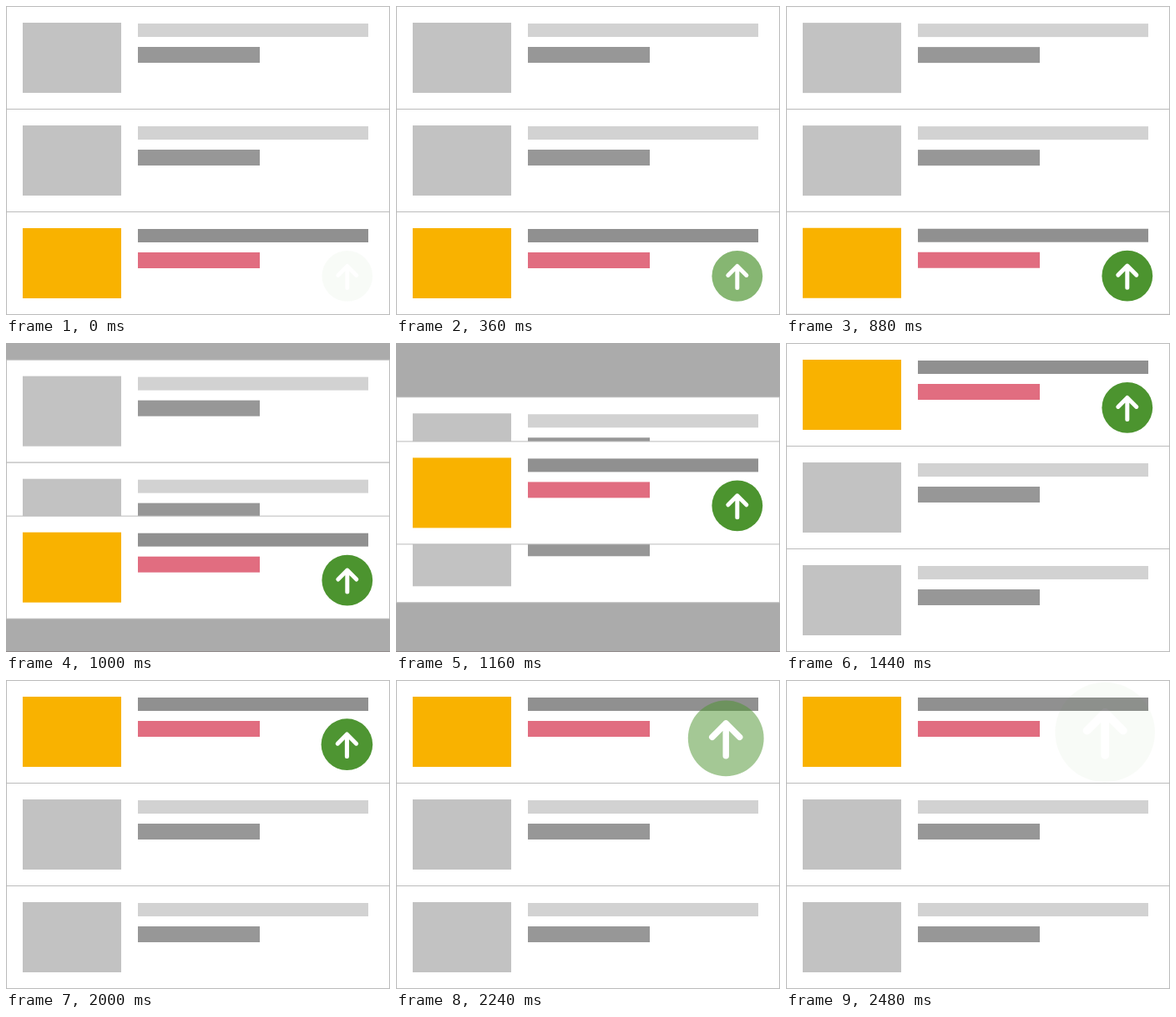
An HTML page that plays this animation: 460x370 px, repeating every 2840 ms.

```html
<!DOCTYPE html>
<html lang="en">
<head>
<meta charset="utf-8">
<title>Card moves to top</title>
<style>
  html, body { margin: 0; width: 100%; height: 100%; overflow: hidden; }
  svg { display: block; width: 460px; height: 370px; background: #ababab; }
  .card { fill: #fff; stroke: #bbb; }
  .thumb { fill: #c2c2c2; }
  .title { fill: #d2d2d2; }
  .label { fill: #979797; }
  .active .thumb { fill: #f9b200; }
  .active .title { fill: #909090; }
  .active .label { fill: #e16d80; }
  #badge circle { fill: #4c942f; }
  #badge path { fill: none; stroke: #fff; stroke-width: 5; stroke-linecap: round; stroke-linejoin: round; }
</style>
</head>
<body>
<svg viewBox="0 0 460 370">
  <defs>
    <g id="row">
      <rect class="card" x=".5" y=".5" width="459" height="123"/>
      <rect class="thumb" x="20" y="20" width="118" height="84"/>
      <rect class="title" x="158" y="21" width="276" height="16"/>
      <rect class="label" x="158" y="49" width="146" height="19"/>
    </g>
  </defs>
  <rect y="369" width="460" height="1" fill="#918b8b"/>
  <g id="others"></g>
  <g id="active" class="active"></g>
  <g id="badge">
    <circle r="30.4"/>
    <path d="M-11-1L0-12L11-1M0-12V14"/>
  </g>
</svg>
<script>
const LOOP = 2840, STEP = 40, ROW = 123;
const byId = id => document.getElementById(id);
const [row, others, active, badge] = ['row', 'others', 'active', 'badge'].map(byId);

function addRow(parent, y) {
  const copy = row.cloneNode(true);
  copy.removeAttribute('id');
  copy.setAttribute('transform', `translate(0 ${y})`);
  parent.append(copy);
}
addRow(others, 0);
addRow(others, ROW);
addRow(active, 0);

const progress = (t, start, end) => Math.min(1, Math.max(0, (t - start) / (end - start)));

// cubic-bezier(.25, 0, .75, 1), solved by bisection
function ease(x) {
  if (x === 0 || x === 1) return x;
  let low = 0, high = 1;
  for (let i = 0; i < 30; i++) {
    const p = (low + high) / 2, q = 1 - p;
    if (.75 * p * q * q + 2.25 * p * p * q + p ** 3 < x) low = p; else high = p;
  }
  return low * low * (3 - 2 * low);
}

const move = (node, x, y, scale = 1) =>
  node.setAttribute('transform', `translate(${x} ${y}) scale(${scale})`);

function draw(now) {
  const t = Math.floor(now % LOOP / STEP) * STEP;
  const fadeIn = Math.max(.03, progress(t, 27, 520));
  const lift = ease(progress(t, 872, 1429));
  const burst = Math.min(.968, progress(t, 1993, 2493));
  const activeY = 2 * ROW * (1 - lift);

  move(others, 0, ROW * lift);
  move(active, 0, activeY);
  move(badge, 408.8 - 27.5 * burst, activeY + 77.4 - 15.3 * burst, 1 + burst);
  badge.setAttribute('opacity', fadeIn * (1 - burst));
}

const begin = performance.now();
function tick() {
  draw(performance.now() - begin);
  requestAnimationFrame(tick);
}
tick();
</script>
</body>
</html>
```
